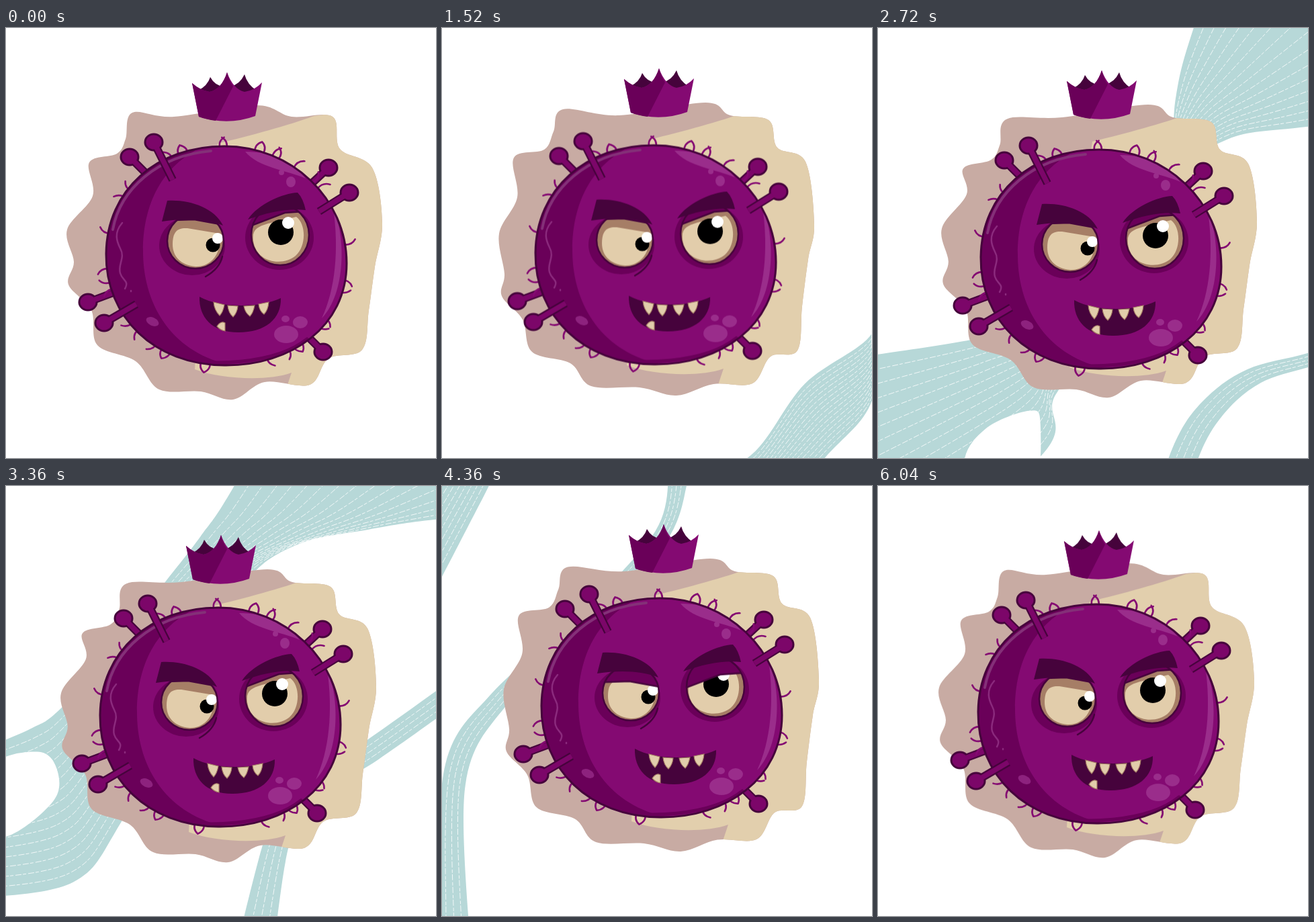
Animation of 640 by 640 pixels, one loop 6080 ms. Source, as an HTML page with a canvas:

```html
<!DOCTYPE html>
<html lang="en">
<head>
<meta charset="utf-8">
<title>Crowned germ</title>
<style>
  html, body { margin: 0; width: 100%; height: 100%; overflow: hidden; background: #fff; }
  canvas, svg { position: absolute; left: 0; top: 0; width: 100%; height: 100%; display: block; }
  .float { animation: float 6080ms ease-in-out infinite; }
  .germ { animation: germ 6080ms ease-in-out infinite; }
  .lid { fill: #6a0059; stroke: #46033c; stroke-width: 2.5; animation: blink 6080ms linear infinite; }
  @keyframes float {
    0%, 100% { transform: translate(0, 0); }
    8% { transform: translate(5px, -1px); }
    18% { transform: translate(3px, -7px); }
    25% { transform: translate(-6px, -6px); }
    31% { transform: translate(-11px, 0); }
    38% { transform: translate(-4px, 0); }
    44.74% { transform: translate(4px, -3px); }
    55.26% { transform: translate(-9px, 7px); }
    63% { transform: translate(-6px, 0); }
    71.71% { transform: translate(1px, -9px); }
    81.58% { transform: translate(-9px, -9px); }
    91% { transform: translate(-8px, 5px); }
  }
  @keyframes germ {
    0%, 100% { transform: translate(0, 0); }
    9% { transform: translate(4px, -3px); }
    18% { transform: translate(-3px, -6px); }
    25% { transform: translate(-10px, -1.5px); }
    35% { transform: translate(-5px, 4px); }
    44.74% { transform: translate(4px, 5px); }
    55.26% { transform: translate(-9px, 5px); }
    63% { transform: translate(-8px, -3px); }
    71.71% { transform: translate(-1px, -9px); }
    81.58% { transform: translate(-9.5px, -1px); }
    91% { transform: translate(-6px, 5px); }
  }
  @keyframes blink {
    0%, 71%, 75.5%, 100% { transform: translateY(0); }
    71.71% { transform: translateY(14px); }
    73.2% { transform: translateY(72px); }
  }
  .main { fill: #840a72; }
  .shade { fill: #6a0059; }
  .deep { fill: #46033c; }
  .shine { fill: #9a2d8b; }
  .cream { fill: #e2cdab; }
  .brown { fill: #a67e66; }
  .line { fill: none; stroke-linecap: round; }
</style>
</head>
<body>
<canvas id="waves" width="640" height="640"></canvas>
<svg viewBox="0 0 640 640">
  <defs>
    <clipPath id="blobClip"><path id="blobEdge"/></clipPath>
    <clipPath id="bodyClip"><path id="bodyShape" d="M149,336 C150,240 225,176 325,176 C425,176 507,254 507,350 C507,444 425,503 325,502 C220,501 148,430 149,336Z"/></clipPath>
    <clipPath id="eyeL"><ellipse cx="282" cy="317" rx="42" ry="41"/></clipPath>
    <clipPath id="eyeR"><ellipse cx="408" cy="308" rx="43" ry="45"/></clipPath>
  </defs>

  <g class="float">
    <path id="blob" fill="#c8aba3"/>
    <path clip-path="url(#blobClip)" fill="#e2cfad" d="M458,131 C420,145 365,160 315,172 L290,340 L281,508 C320,523 390,526 425,513 L416,540 L620,570 L620,110Z"/>
    <path class="deep" d="M286,93 Q300,86 304,73 Q311,86 324,87 L306,104Z M373,93 Q359,84 355,69 Q348,84 334,87 L352,104Z"/>
    <path class="main" d="M277,82 Q289,93 303,95 Q321,91 329,66 Q338,91 355,95 Q370,93 381,81 L371,131 Q330,146 287,132Z"/>
    <path class="shade" d="M277,82 Q289,93 303,95 Q321,91 329,66 Q332,78 338,87 L312,138 Q298,136 287,132Z"/>
  </g>

  <g class="germ">
    <g id="backSpikes"></g>
    <path id="hairs" class="line" stroke="#840a72" stroke-width="2.6"/>
    <use href="#bodyShape" class="main"/>
    <g clip-path="url(#bodyClip)">
      <path class="shade" d="M310,170 C235,195 203,260 204,335 C205,420 255,492 350,504 L120,520 L120,160Z"/>
      <path class="line" stroke="#843078" stroke-width="4" d="M159,300 C170,240 225,190 305,183"/>
      <path class="line" stroke="#6a0059" stroke-width="5" d="M250,492 C300,503 400,502 448,463"/>
      <path class="shine" d="M356,184 C395,184 425,198 446,224 C420,212 375,208 356,184Z"/>
      <path class="shine" d="M487,268 C506,310 506,395 470,432 C490,390 496,330 487,268Z"/>
    </g>
    <use href="#bodyShape" fill="none" stroke="#46033c" stroke-width="3"/>
    <g class="shine">
      <ellipse cx="424" cy="229" rx="7" ry="8"/>
      <circle cx="410" cy="215" r="4"/>
      <ellipse cx="417" cy="456" rx="18" ry="13"/>
      <ellipse cx="438" cy="438" rx="11" ry="9"/>
      <ellipse cx="416" cy="433" rx="6" ry="5"/>
      <ellipse cx="218" cy="437" rx="10" ry="6" transform="rotate(25 218 437)" opacity=".75"/>
    </g>
    <path class="line" stroke="#8b2a7d" stroke-width="2.5" d="M173,290 C160,305 165,318 170,328 C178,342 166,352 170,365 C173,376 184,376 177,388 M186,391 l0,1"/>
    <g id="frontSpikes"></g>

    <ellipse cx="277" cy="324" rx="49" ry="44" class="shade"/>
    <ellipse cx="407" cy="312" rx="51" ry="48" class="shade"/>
    <path class="line" stroke="#46033c" stroke-width="2.5" d="M322,340 Q318,358 297,370"/>

    <g clip-path="url(#eyeL)">
      <rect class="brown" x="230" y="270" width="100" height="95"/>
      <path class="cream" d="M248,322 C248,302 256,297 270,298 L318,306 C322,335 305,356 282,355 C260,353 248,340 248,322Z"/>
      <circle cx="308" cy="323" r="10.5"/>
      <circle cx="315" cy="313" r="8" fill="#fff"/>
      <path class="lid" d="M220,150 H340 V296 L280,285 L220,287Z"/>
    </g>
    <ellipse cx="282" cy="317" rx="42" ry="41" fill="none" stroke="#46033c" stroke-width="2.5"/>
    <g clip-path="url(#eyeR)">
      <rect class="brown" x="360" y="260" width="100" height="100"/>
      <path class="cream" d="M368,316 C366,300 374,296 390,291 L432,281 C447,292 447,325 431,339 C412,355 372,350 368,316Z"/>
      <circle cx="409" cy="304" r="19"/>
      <circle cx="420" cy="290" r="9" fill="#fff"/>
      <path class="lid" d="M350,150 H470 V271 L415,275 L350,300Z"/>
    </g>
    <ellipse cx="408" cy="308" rx="43" ry="45" fill="none" stroke="#46033c" stroke-width="2.5"/>
    <path class="deep" d="M240,257 C272,255 310,267 323,294 C300,284 265,283 232,288Z"/>
    <path class="deep" d="M360,285 C375,262 412,246 434,245 Q442,253 446,271 C420,268 390,274 360,285Z"/>

    <path class="deep" d="M288,400 C318,417 378,417 409,402 C410,433 386,453 346,453 C306,453 287,430 288,400Z"/>
    <g class="cream" stroke="#a67e66" stroke-width="1.2">
      <path d="M309,408 L325,412 Q323,423 318,428 Q310,420 309,408Z"/>
      <path d="M330,413 L345,414 Q344,424 338,430 Q331,424 330,413Z"/>
      <path d="M354,414 L370,413 Q368,424 363,429 Q356,424 354,414Z"/>
      <path d="M376,411 L391,408 Q390,420 384,426 Q377,421 376,411Z"/>
      <path d="M314,444 Q320,435 326,439 L326,451 Q319,450 314,444Z"/>
    </g>
  </g>
</svg>

<script>
const LOOP = 6080;
const $ = id => document.getElementById(id);
const pts = s => s.split(' ').map(p => p.split(',').map(Number));
const mix = (a, b, k) => a.map((p, i) => p.map((v, j) => v + (b[i][j] - v) * k));
const shift = (list, d) => list.map(([x, y, ...rest]) => [x + d, y + d, ...rest]);

// Smooth path through the points
function curve(p, closed) {
  const n = p.length;
  const at = i => closed ? p[(i + n) % n] : p[Math.max(0, Math.min(n - 1, i))];
  let d = 'M' + p[0].slice(0, 2);
  for (let i = 0; i < (closed ? n : n - 1); i++) {
    const [a, b, c, e] = [at(i - 1), at(i), at(i + 1), at(i + 2)];
    d += `C${b[0] + (c[0] - a[0]) / 6},${b[1] + (c[1] - a[1]) / 6} ` +
         `${c[0] - (e[0] - b[0]) / 6},${c[1] - (e[1] - b[1]) / 6} ${c[0]},${c[1]}`;
  }
  return closed ? d + 'Z' : d;
}

// Spikes and hairs
function spike(hx, hy, bx, by) {
  const part = (color, w, r) =>
    `<path d="M${hx},${hy}L${bx},${by}" stroke="${color}" stroke-width="${w}"/>` +
    `<ellipse cx="${hx}" cy="${hy}" rx="${r}" ry="${r - 1}" fill="${color}"/>`;
  return part('#46033c', 12, 14.5) + part('#7c0669', 7.5, 11.5);
}
$('backSpikes').innerHTML = spike(184, 192, 216, 224) + spike(480, 208, 450, 236) +
  spike(122, 408, 165, 392) + spike(472, 482, 445, 455);
$('frontSpikes').innerHTML = spike(220, 170, 248, 226) + spike(511, 245, 466, 273) +
  spike(146, 439, 194, 411);

const hairAngles = [-93, -90, -76, -72, -67, -64, -55, -109, -113, -117, -143, -148, -168, 173, 166,
  162, 142, 137, 126, 122, 118, 102, 98, 70, 59, 56, 52, 40, 35, 19, 13, -6, -39, -43];
const rim = (deg, k) => {
  const a = deg * Math.PI / 180;
  return [328 + 180 * k * Math.cos(a), 339 + 164 * k * Math.sin(a)];
};
$('hairs').setAttribute('d', hairAngles.map((a, i) => {
  const bend = i % 2 ? 2 : -2;
  return `M${rim(a, .97)}Q${rim(a + bend / 2, 1.04)} ${rim(a - bend, 1.075)}`;
}).join(''));

// Wobbling backdrop
const blobA = pts('188,126 178,165 165,187 124,200 129,250 91,300 101,348 93,382 127,420 136,472 193,496 228,538 290,541 338,553 385,527 452,531 480,492 530,479 540,420 549,355 560,290 545,208 497,180 486,132 425,132 372,115 250,132');
const blobB = pts('186,127 172,160 158,187 113,199 118,258 91,312 99,372 95,405 126,440 140,488 197,505 228,539 300,541 355,553 410,536 468,535 495,495 535,486 542,420 551,350 560,298 547,205 505,184 492,143 435,136 398,117 270,136');

function drawBlob(t) {
  const a = 2 * Math.PI * t / LOOP;
  const side = (1 - Math.cos(2 * a)) / 2;
  const top = Math.min(1, 1 - Math.cos(a));
  const drop = 13 * Math.max(0, -Math.cos(a));
  const shape = blobA.map(([x, y], i) => {
    const k = i > 20 ? top : side;
    return [x + (blobB[i][0] - x) * k, y + (blobB[i][1] - y) * k + (i < 4 ? drop : 0)];
  });
  const d = curve(shape, true);
  $('blob').setAttribute('d', d);
  $('blobEdge').setAttribute('d', d);
}

// Drifting bands: poses at set times, steady diagonal drift before and after
const T1 = 2720, T2 = 3360, T3 = 4360, T4 = 4960;
const outer = [
  [T1, pts('560,-250 470,0 444,100 440,170 436,251 336,326 251,436 140,464 -20,489')],
  [T2, pts('480,-250 340,0 290,75 232,150 200,195 165,245 78,335 40,360 -20,386')]];
const inner = [
  [T1, pts('900,120 640,147 520,166 440,230 436,351 366,436 265,545 240,640 -40,860')],
  [T2, pts('820,35 640,50 540,65 435,87 360,140 300,260 172,500 100,590 -40,614')]];
const hole = [
  [T1, pts('128,650 160,597 225,570 242,590 230,700 150,740')],
  [T2, pts('-20,415 50,396 77,425 70,470 0,522 -60,500')]];
// x, y, half thickness
const ribbon = [
  [T1, pts('770,440,8 660,488,8 560,518,10 495,570,13 455,640,16 420,760,18')],
  [T2, pts('670,305,12 540,397,12 470,440,12 420,500,14 400,545,16 370,700,24')],
  [T3, pts('352,-20,14 326,75,8 200,215,10 85,318,10 20,430,15 18,660,24')],
  [T4, pts('112,-20,13 97,60,10 60,140,9 -10,220,6 -60,260,6 -120,330,8')]];

function pose(keys, t, rateOut) {
  const last = keys[keys.length - 1];
  if (t <= keys[0][0]) return shift(keys[0][1], .17 * (keys[0][0] - t));
  if (t >= last[0]) return shift(last[1], -rateOut * (t - last[0]));
  const i = keys.findIndex(k => k[0] > t);
  const [a, b] = [keys[i - 1], keys[i]];
  return mix(a[1], b[1], (t - a[0]) / (b[0] - a[0]));
}

const ctx = $('waves').getContext('2d');
function band(a, b, count) {
  ctx.fillStyle = '#b7d8d8';
  ctx.fill(new Path2D(curve(a) + curve([...b].reverse()).replace('M', 'L') + 'Z'));
  ctx.strokeStyle = 'rgba(255,255,255,.8)';
  ctx.lineWidth = 1;
  ctx.setLineDash([9, 3, 5, 2]);
  for (let i = 1; i < count; i++) ctx.stroke(new Path2D(curve(mix(a, b, i / count))));
}

function drawWaves(t) {
  ctx.clearRect(0, 0, 640, 640);
  band(pose(outer, t, .24), pose(inner, t, .24), 16);
  ctx.fillStyle = '#fff';
  ctx.fill(new Path2D(curve(pose(hole, t, .24), true)));
  const mid = pose(ribbon, t, .18);
  const edge = s => mid.map(([x, y, w]) => [x + s * w, y + s * w]);
  band(edge(-1), edge(1), 4);
}

function frame(now) {
  const t = now % LOOP;
  drawBlob(t);
  drawWaves(t);
  requestAnimationFrame(frame);
}
frame(0);
</script>
</body>
</html>
```
